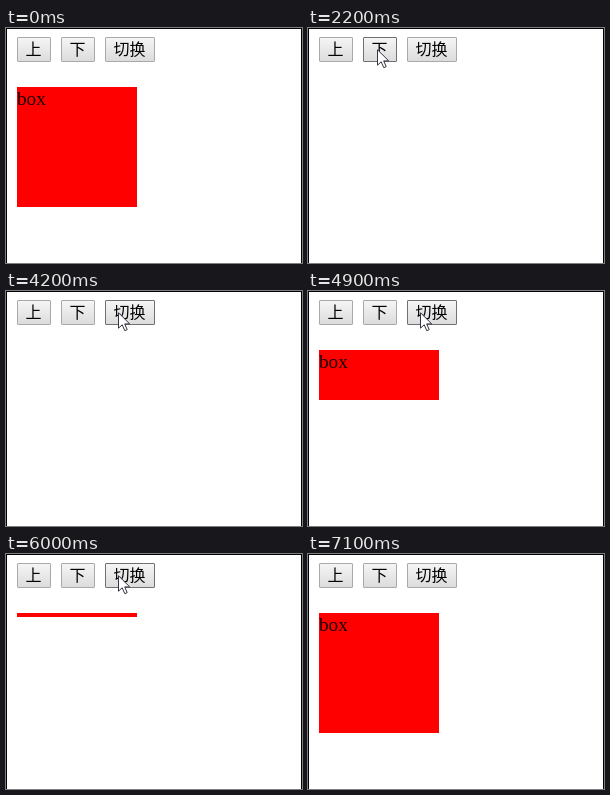
These frames come from a looping animation (296x235 px, 9900 ms). An HTML page:

```html
<!DOCTYPE html>
<html lang="zh-CN">
<head>
<meta charset="utf-8">
<title>Slide toggle</title>
<style>
  html, body { margin: 0; width: 100%; height: 100%; overflow: hidden; background: #fff; }
  #stage {
    position: relative; width: 296px; height: 235px; overflow: hidden; box-sizing: border-box;
    border: 1px solid #000; border-bottom: 0; background: #fff;
  }
  #stage > * { position: absolute; }
  .btn {
    top: 8px; width: 34px; height: 25px; box-sizing: border-box; padding-right: 1px;
    border: 1px solid #a9a9a9; border-radius: 1px;
    background: linear-gradient(#f5f5f5, #dcdcdc);
    font: 300 16px/21px "Noto Sans CJK SC", "Noto Sans CJK", sans-serif;
    text-align: center; white-space: nowrap; color: #000;
  }
  .hover { border-color: #707070; }
  .down { background: linear-gradient(#dcdcdc, #f1f1f1); }
  #up { left: 10px; }
  #dn { left: 54px; }
  #tg { left: 98px; width: 50px; }
  #box {
    left: 10px; top: 58px; width: 120px; height: 120px; overflow: hidden;
    background: #f00; color: #1c0000;
    font: 19.2px/23px "Liberation Serif", "Times New Roman", serif;
  }
  #cursor { left: -1px; top: -1px; }
</style>
</head>
<body>
<div id="stage">
  <div class="btn" id="up">上</div>
  <div class="btn" id="dn">下</div>
  <div class="btn" id="tg">切换</div>
  <div id="box">box</div>
  <svg id="cursor" width="13" height="20" viewBox="0 0 13 20">
    <path d="M.5 .8V16.2L4.2 12.8L6.8 18.7L9.2 17.6L6.7 11.9H11.7Z" fill="#fff" stroke="#333344"/>
  </svg>
</div>
<script>
const LOOP = 9900, TICK = 100, SIZE = 120, PRESS = 60, ENTER = 100;
const $ = id => document.getElementById(id);
const box = $('box'), cursor = $('cursor'), buttons = document.querySelectorAll('.btn');

// Each click reverses the box: closed, open, closed...
const clicks = [
  { id: 'up', at: 640 }, { id: 'dn', at: 2300, length: 400 }, { id: 'tg', at: 3644 },
  { id: 'tg', at: 4655 }, { id: 'tg', at: 5515 }, { id: 'tg', at: 6350 }
];

// Pointer trips; a higher power brakes harder
const trips = [
  { from: ENTER, to: 500, x: 24, y: 21, power: 4 },
  { from: 1500, to: 2000, x: 69, y: 21, power: 2 },
  { from: 3000, to: 3500, x: 112, y: 21, power: 2 },
  { from: 6600, to: 7100, x: 297, y: 163, power: 0.8 }
];

const clamp = p => Math.min(1, Math.max(0, p));
const swing = p => 0.5 - Math.cos(Math.PI * p) / 2;

function boxHeight(t) {
  const i = clicks.filter(c => c.at <= t).length - 1;
  if (i < 0) return SIZE;
  const { at, length = 549 } = clicks[i];
  const k = swing(clamp((t - at) / length));
  return Math.round(SIZE * (i % 2 ? k : 1 - k));
}

function pointer(t) {
  let x = 279, y = 41;
  for (const trip of trips) {
    const k = 1 - (1 - clamp((t - trip.from) / (trip.to - trip.from))) ** trip.power;
    x += (trip.x - x) * k;
    y += (trip.y - y) * k;
  }
  return [Math.round(x), Math.round(y)];
}

function over(el, x, y) {
  const dx = x - 1 - el.offsetLeft, dy = y - 1 - el.offsetTop;
  return dx >= 0 && dx < el.offsetWidth && dy >= 0 && dy < el.offsetHeight;
}

function draw(t) {
  const [x, y] = pointer(t);
  cursor.style.visibility = t < ENTER ? 'hidden' : 'visible';
  cursor.style.transform = `translate(${x}px, ${y}px)`;
  box.style.height = boxHeight(t) + 'px';
  for (const el of buttons) {
    const pressed = clicks.some(c => c.id === el.id && t >= c.at - PRESS && t < c.at);
    el.classList.toggle('hover', over(el, x, y));
    el.classList.toggle('down', pressed);
  }
}

const begin = performance.now();
function frame() {
  const t = (performance.now() - begin) % LOOP;
  draw(Math.floor(t / TICK) * TICK);
  requestAnimationFrame(frame);
}
frame();
</script>
</body>
</html>
```
